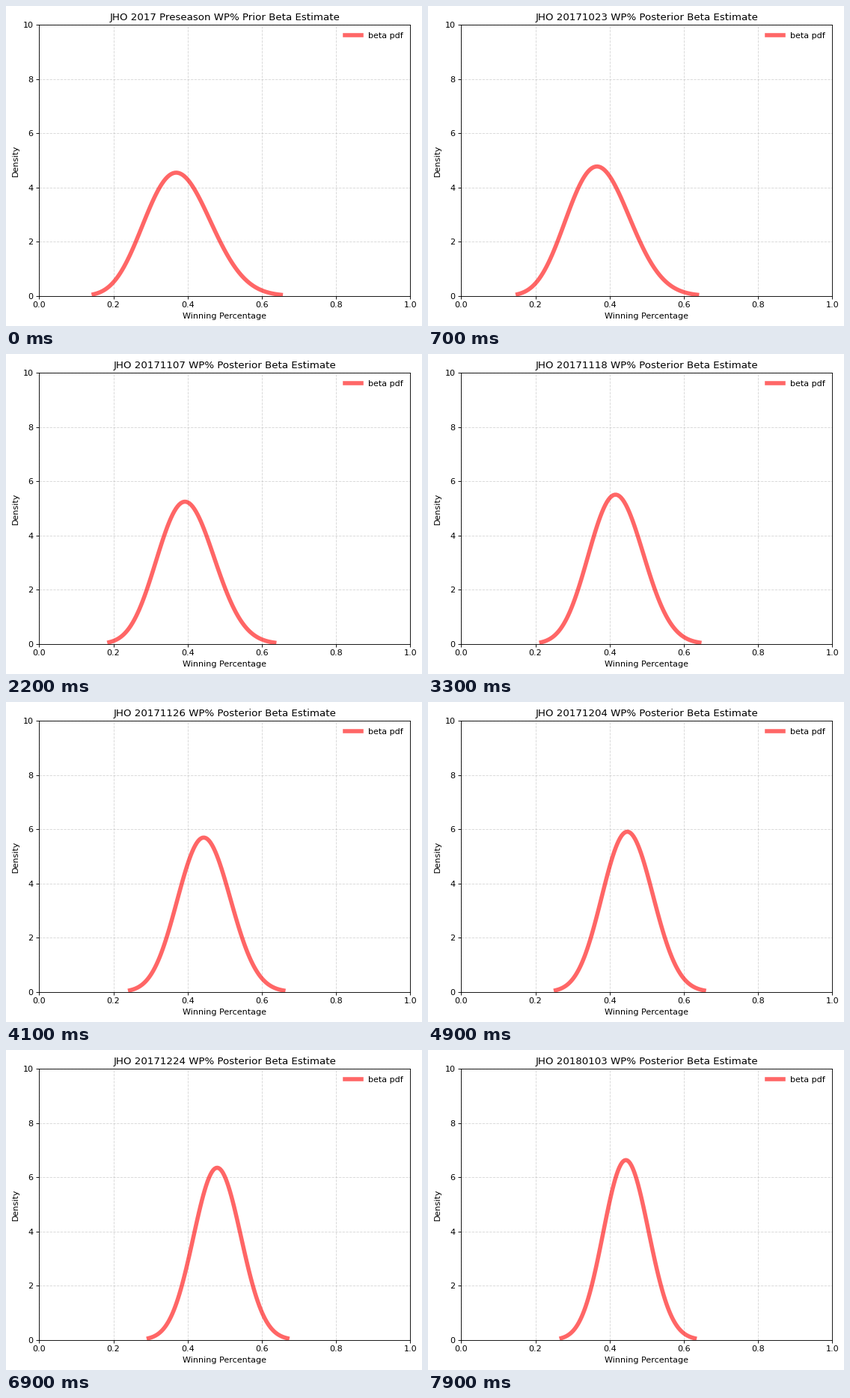
These frames come from a looping animation (556x428 px, 8000 ms). A matplotlib script:

```python
import math

import numpy as np
import matplotlib.pyplot as plt
from matplotlib.animation import FuncAnimation

W, H, DPI = 556, 428, 80
DAYS = 80
PRIOR = 11.63, 19.17
START = np.datetime64("2017-10-16")
TEAM = "JHO"

# Days since START on which a game was won or lost.
WINS = [2, 8, 13, 15, 16, 25, 30, 32, 34, 35, 39, 42, 49, 51, 53, 55, 62, 65, 68]
LOSSES = [4, 5, 9, 18, 20, 22, 23, 27, 40, 44, 46, 58, 60, 63, 71, 72, 74, 76, 79]

GRID = np.linspace(0, 1, 8001)[1:-1]


def beta_pdf(x, a, b):
    norm = math.lgamma(a + b) - math.lgamma(a) - math.lgamma(b)
    return np.exp(norm + (a - 1) * np.log(x) + (b - 1) * np.log(1 - x))


def beta_curve(a, b, tail=0.001):
    """Density between the lower and upper tail quantiles."""
    cdf = np.cumsum(beta_pdf(GRID, a, b))
    lo, hi = np.interp([tail, 1 - tail], cdf / cdf[-1], GRID)
    x = np.linspace(lo, hi, 100)
    return x, beta_pdf(x, a, b)


def count(days, today):
    return sum(d <= today for d in days)


def heading(day):
    if day == 0:
        return f"{TEAM} 2017 Preseason WP% Prior Beta Estimate"
    date = str(START + day).replace("-", "")
    return f"{TEAM} {date} WP% Posterior Beta Estimate"


plt.rcParams.update({"font.family": "DejaVu Sans", "font.size": 10})
fig = plt.figure(figsize=(W / DPI, H / DPI), dpi=DPI, facecolor="white")
ax = fig.add_axes([44.4 / W, 40.3 / H, 496 / W, 362.4 / H])
ax.set(xlim=(0, 1), ylim=(0, 10), xlabel="Winning Percentage", ylabel="Density")
ax.grid(color="#b0b0b0", linestyle="--", linewidth=0.8, alpha=0.5)
line, = ax.plot([], [], "r-", lw=5, alpha=0.6, label="beta pdf")
ax.legend(loc="upper right", frameon=False)
title = ax.set_title("")


def update(day):
    a = PRIOR[0] + count(WINS, day)
    b = PRIOR[1] + count(LOSSES, day)
    line.set_data(*beta_curve(a, b))
    title.set_text(heading(day))
    return line, title


anim = FuncAnimation(fig, update, frames=DAYS, interval=100, repeat=True,
                     repeat_delay=0, blit=False)
plt.show()
```
